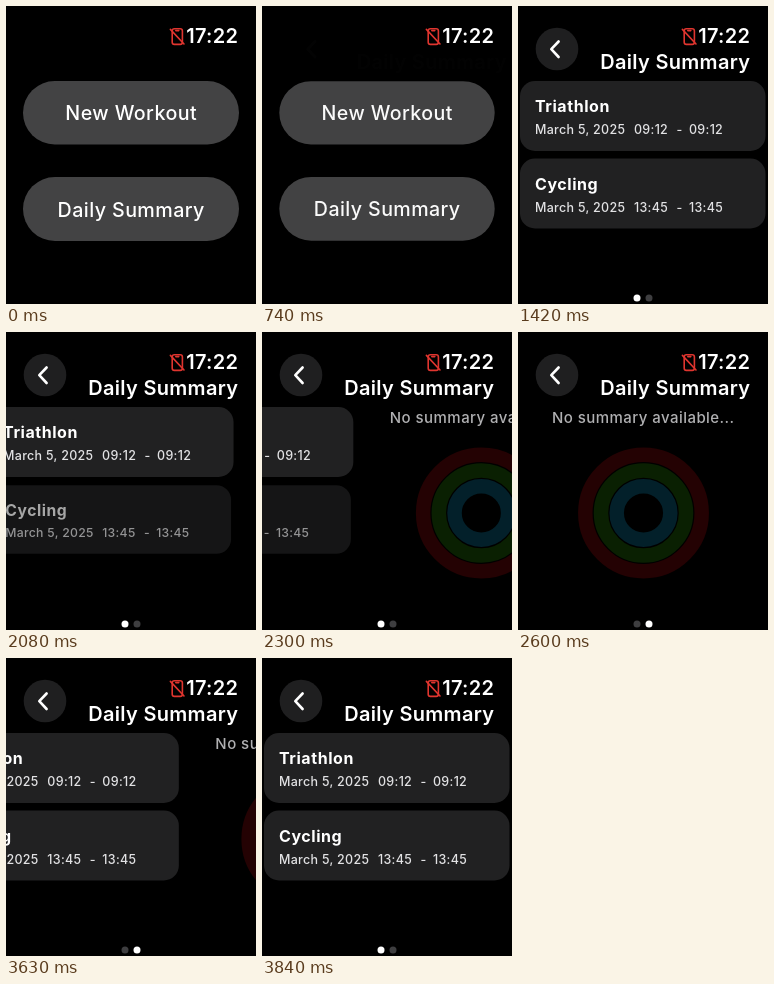
An HTML page that plays this animation: 250 by 298 pixels, repeating every 4.61 s.

```html
<!DOCTYPE html>
<html lang="en">
<head>
<meta charset="utf-8">
<title>Daily Summary</title>
<style>
html, body { margin: 0; width: 100%; height: 100%; overflow: hidden; background: #000; }
svg { display: block; width: 100vw; height: 100vh; font-family: Inter, Roboto, sans-serif; fill: #fff; }
.head { font-size: 20px; font-weight: 600; letter-spacing: .3px; }
.label { font-size: 19.7px; font-weight: 500; letter-spacing: .4px; }
.name { font-size: 16px; font-weight: 700; letter-spacing: .55px; }
.info { font-size: 12.5px; font-weight: 500; letter-spacing: .3px; fill: #e2e2e4; }
.note { font-size: 15px; font-weight: 500; letter-spacing: .45px; fill: #b0b0b2; }
.clock { font-size: 20px; font-weight: 600; letter-spacing: .3px; }
</style>
</head>
<body>
<svg viewBox="0 0 250 298">
  <defs>
    <filter id="soft" filterUnits="userSpaceOnUse" x="-50" y="0" width="350" height="320">
      <feGaussianBlur id="blur" stdDeviation="0"/>
    </filter>
  </defs>
  <rect width="250" height="298" fill="#000"/>

  <g id="menu">
    <g fill="#434344">
      <rect x="17" y="75" width="216" height="63.5" rx="31.75"/>
      <rect x="17" y="171" width="216" height="64" rx="32"/>
    </g>
    <g id="labels" class="label" text-anchor="middle">
      <text x="125.2" y="114">New Workout</text>
      <text x="125.2" y="210.5">Daily Summary</text>
    </g>
  </g>

  <g id="list"></g>

  <g id="rings">
    <text class="note" x="125.3" y="91" text-anchor="middle">No summary available...</text>
    <g id="circles" fill="none" stroke-width="14.5"></g>
  </g>

  <g id="back">
    <circle cx="39" cy="43" r="21.3" fill="#1f1f20"/>
    <path d="M40.6 35.5L33.3 43.2L40.6 51" fill="none" stroke="#fff" stroke-width="2.6" stroke-linecap="round" stroke-linejoin="round"/>
  </g>
  <text id="title" class="head" x="232.3" y="63" text-anchor="end">Daily Summary</text>

  <g id="dots">
    <circle cx="119" cy="292" r="3.5"/>
    <circle cx="131" cy="292" r="3.5"/>
  </g>

  <g fill="none" stroke="#e0352f" stroke-width="1.6" stroke-linecap="round">
    <rect x="166.2" y="22.8" width="10.2" height="15.6" rx="2.2"/>
    <path d="M169.8 24.6h3M164.4 23.4L178 38"/>
  </g>
  <text class="clock" x="232.3" y="37.4" text-anchor="end">17:22</text>
</svg>
<script>
const LOOP = 4610;
// the screen refreshes only at these moments
const TICKS = [0, 740, 850, 950, 1070, 1190, 1300, 1420, 2080, 2180, 2300,
  2400, 2500, 2600, 3410, 3530, 3630, 3740, 3840];
const $ = id => document.getElementById(id);
const clamp = v => Math.min(1, Math.max(0, v));
const set = (el, attrs) => { for (const k in attrs) el.setAttribute(k, attrs[k]); };
const slide = x => `translate(${x} 0)`;
const zoom = (s, x, y) => `translate(${x} ${y}) scale(${s}) translate(${-x} ${-y})`;

const card = (y, name, time) => `<g>
  <rect x="2" y="${y}" width="245.5" height="70" rx="15" fill="#f8f8ff" fill-opacity=".135"/>
  <text class="name" x="17" y="${y + 31}">${name}</text>
  <g class="info">
    <text x="17" y="${y + 53}">March 5, 2025</text>
    <text x="116" y="${y + 53}">${time}</text>
    <text x="158.5" y="${y + 53}">-</text>
    <text x="171" y="${y + 53}">${time}</text>
  </g></g>`;
$('list').innerHTML = card(75, 'Triathlon', '09:12') + card(152.5, 'Cycling', '13:45');
$('circles').innerHTML = ['#240203', '#0a2002', '#03202a'].map((color, i) =>
  `<circle cx="125.5" cy="181" r="${58.2 - i * 15.7}" stroke="${color}"/>`).join('');

const [dotA, dotB] = $('dots').children;
const lower = $('list').children[1];

// eased 0..1 between two times; bend shifts the midpoint
function ease(t, from, to, bend) {
  const u = clamp((t - from) / (to - from)) ** bend;
  return u * u * (3 - 2 * u);
}

function draw(t) {
  const push = ease(t, 700, 1190, 1.25);
  const swipe = ease(t, 2030, 2600, .72) - ease(t, 3388, 3840, .72);

  // the menu shrinks, blurs and fades behind the incoming list
  set($('menu'), { opacity: (1 - push) ** 1.4, transform: zoom(1 - .5 * push, 125, 151),
    filter: push ? 'url(#soft)' : 'none' });
  set($('labels'), { opacity: clamp(1 - 2.5 * push) });
  set($('blur'), { stdDeviation: 20 * push });

  set($('list'), { opacity: clamp(push * 3), transform: slide(250 * (1 - push - swipe)) });
  set($('rings'), { opacity: swipe > 0 ? 1 : 0, transform: slide(250 * (1 - swipe)) });

  // the lower card stays pressed while the finger drags
  const held = t >= 2080 && t < 2450;
  set(lower, { opacity: held ? .65 : 1, transform: zoom(held ? .98 : 1, 125, 187.5) });

  const lag = slide(12.5 * (1 - push));
  set($('back'), { opacity: clamp(push * 1.8), transform: lag });
  set($('title'), { opacity: clamp(push * 1.4), transform: lag });

  const second = t >= 2450 && t < 3690;
  set($('dots'), { opacity: clamp(push * 2 - 1) });
  set(dotA, { fill: second ? '#3e3e40' : '#fff' });
  set(dotB, { fill: second ? '#fff' : '#3e3e40' });
}

const start = performance.now();
function frame() {
  const t = (performance.now() - start) % LOOP;
  draw(TICKS.filter(v => v <= t).pop());
  requestAnimationFrame(frame);
}
frame();
</script>
</body>
</html>
```
